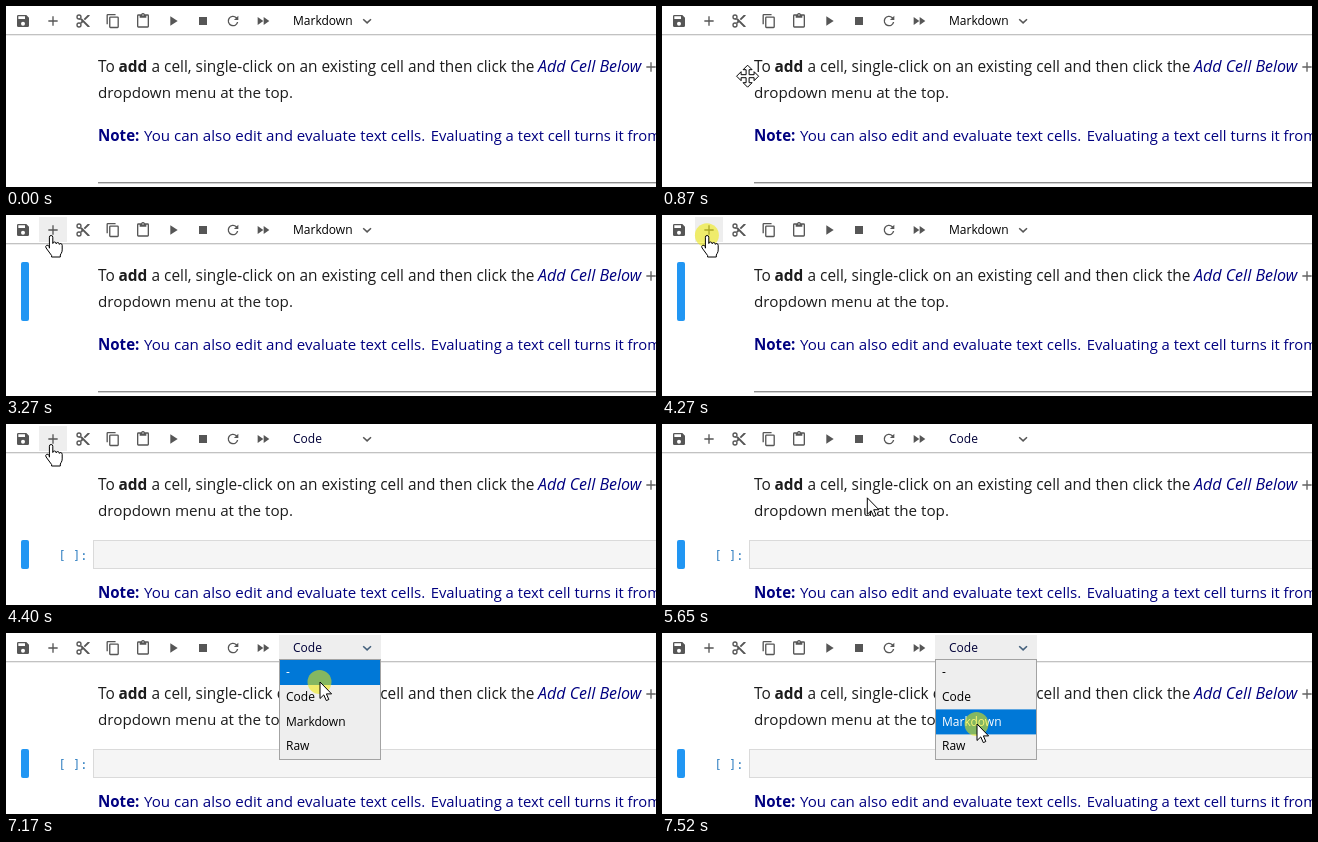
Recreate the animation shown at these times as an HTML page. Size 650 by 181 pixels, loop 8 s.

```html
<!DOCTYPE html>
<html lang="en">
<head>
<meta charset="utf-8">
<title>Adding a notebook cell</title>
<style>
html, body { margin: 0; width: 100%; height: 100%; overflow: hidden; background: #fff; }
svg { display: block; font-family: "Open Sans", "Noto Sans", sans-serif; }
.body { font-size: 15.4px; fill: #1c1c1c; }
.note { font-size: 15.1px; }
.body .navy, .navy { fill: navy; }
.bold { font-weight: 700; }
.ui { font-size: 12px; fill: #000; }
.mono { font: 12px "DejaVu Sans Mono", monospace; fill: #307fc1; white-space: pre; }
#cursor path { fill: #fff; stroke: #000; stroke-width: 1; stroke-linejoin: round; }
</style>
</head>
<body>
<svg width="650" height="181" viewBox="0 0 650 181">
  <rect width="650" height="181" fill="#fff"/>
  <rect id="bar" x="15" width="8" rx="2" fill="#2196f3"/>

  <g class="body">
    <text y="66"><tspan x="92">To</tspan><tspan x="112.5" class="bold">add</tspan><tspan x="145.5">a cell, single-click on an existing cell and then click the</tspan><tspan x="532" class="navy" font-style="italic" font-size="16.1">Add Cell Below</tspan></text>
    <text x="92" y="92" font-size="15.2">dropdown menu at the top.</text>
    <g id="plusMark" fill="#616161"></g>
  </g>

  <g id="cell">
    <rect x="87.5" y="116.5" width="580" height="28" fill="#f5f5f5" stroke="#dadada"/>
    <text class="mono" x="52.5" y="136">[ ]:</text>
  </g>

  <g id="below">
    <text class="body note navy" y="135"><tspan x="92" class="bold">Note:</tspan><tspan x="138">You can also edit and evaluate text cells.</tspan><tspan x="424.7" font-size="14.8">Evaluating a text cell turns it from</tspan></text>
    <rect x="92" y="176" width="558" height="1" fill="#8f8f8f"/>
    <rect x="92" y="177" width="558" height="1" fill="#d2d2d2"/>
  </g>

  <rect width="650" height="28" fill="#fff"/>
  <rect y="28" width="650" height="1" fill="#c2c2c2"/>
  <rect y="29" width="650" height="1" fill="#ececec"/>
  <rect id="plusHover" x="33" y="2" width="28" height="25" fill="#eee"/>
  <rect id="kindHover" x="273" y="2" width="102" height="24" fill="#eee"/>
  <g id="icons" fill="#565656" fill-rule="evenodd"></g>
  <text id="kind" class="ui" x="287" y="19"></text>
  <path id="chevron" d="M357.2 13.2l3.9 3.7 3.9-3.7" fill="none" stroke-width="1.5"/>

  <g id="list">
    <rect x="273.5" y="26.5" width="101" height="100" fill="#eee" stroke="#a3a3a3"/>
    <rect id="pick" x="274" width="100" height="25" fill="#0078d7"/>
  </g>

  <g id="tip">
    <rect x="45.5" y="41.5" width="107" height="21" fill="#fff" stroke="#767676"/>
    <text x="51" y="56.5" font-size="11.5" fill="#575757">Insert a cell below</text>
  </g>

  <circle id="click" r="12" fill="#f0eb00" fill-opacity=".55"/>
  <g id="cursor">
    <path id="arrow" d="M0 0V16.5L3.8 12.9 6.3 18.6 8.8 17.5 6.4 11.9H11.6Z"/>
    <path id="hand" d="M-2 13V2a1.7 1.7 0 0 1 3.4 0V8.3q0-1.6 1.7-1.5t1.7 1.8q.1-1.3 1.6-1.2t1.6 1.8q.3-1 1.5-.8t1.3 1.7v4.6q0 2-1 3.5l-.9 1.6v2H.2v-1.5L-5.3 12.8q-1-1.8 .4-2.6t2.9 1.3z"/>
    <path id="move"/>
  </g>
</svg>
<script>
const LOOP = 8000, ROW = 24.7, LIST_TOP = 27;
const $ = id => document.getElementById(id);
const show = (id, on) => $(id).setAttribute('display', on ? 'inline' : 'none');
const set = (id, name, value) => $(id).setAttribute(name, value);
const ring = (x, y, r) => `M${x - r} ${y}a${r} ${r} 0 1 0 ${2 * r} 0a${r} ${r} 0 1 0 ${-2 * r} 0z`;

const PLUS = 'M19 13h-6v6h-2v-6H5v-2h6V5h2v6h6z';
const icon = (d, cx, cy, box = 24) =>
  `<path transform="translate(${cx - 8} ${cy - 8}) scale(${16 / box})" d="${d}"/>`;

// Toolbar icons, some with the side of their own grid
const ICONS = [
  ['M17 3H5a2 2 0 0 0-2 2v14a2 2 0 0 0 2 2h14a2 2 0 0 0 2-2V7zM15 9H5V5h10z' + ring(12, 16, 3)],
  [PLUS],
  [ring(6, 6, 4) + ring(6, 6, 2) + ring(6, 18, 4) + ring(6, 18, 2) +
    'M9.64 7.64L22 20v1h-3l-7-7-2.36 2.36-2-2L10 12 7.64 9.64zM19 3l-6 6 2 2 7-7V3z'],
  ['M11.9 1H3.2a1.5 1.5 0 0 0-1.5 1.5v10.2h1.5V2.5h8.7zM14.1 3.9h-8a1.5 1.5 0 0 0-1.5 1.5v10.2a1.5 1.5 0 0 0 1.5 1.5h8a1.5 1.5 0 0 0 1.5-1.5V5.4a1.5 1.5 0 0 0-1.5-1.5zM14.1 15.5h-8V5.4h8z', 18],
  ['M19 2h-4.2a3 3 0 0 0-5.6 0H5a2 2 0 0 0-2 2v16a2 2 0 0 0 2 2h14a2 2 0 0 0 2-2V4a2 2 0 0 0-2-2zM19 20H5V4h2v3h10V4h2z' + ring(12, 3, 1)],
  ['M8 5v14l11-7z'],
  ['M6 6h12v12H6z'],
  ['M9 13.5a4.5 4.5 0 1 1 3.17-7.67L10 8h5V3l-1.76 1.76A6 6 0 1 0 14.9 10h-1.52A4.5 4.5 0 0 1 9 13.5z', 18],
  ['M4 18l8.5-6L4 6zM13 6v12l8.5-6z'],
];
$('icons').innerHTML = ICONS.map(([d, box], i) => icon(d, 17 + 30 * i, 15, box)).join('');
$('plusMark').innerHTML = icon(PLUS, 645, 61);

// Four-way cursor: one arm turned by quarter turns
let arm = [[-1.5, -1.5], [-1.5, -6.5], [-4.5, -6.5], [0, -11], [4.5, -6.5], [1.5, -6.5]];
let star = [];
for (let i = 0; i < 4; i++) {
  star = star.concat(arm);
  arm = arm.map(([x, y]) => [-y, x]);
}
set('move', 'd', 'M' + star.join('L') + 'Z');

const options = ['-', 'Code', 'Markdown', 'Raw'].map((label, i) => {
  const el = document.createElementNS('http://www.w3.org/2000/svg', 'text');
  el.textContent = label;
  el.setAttribute('class', 'ui');
  el.setAttribute('x', 280);
  el.setAttribute('y', 43.3 + ROW * i);
  $('list').append(el);
  return el;
});

const smooth = p => p * p * (3 - 2 * p);
const easeOut = p => 1 - (1 - p) ** 2;
const linear = p => p;

// Bézier curve over any number of [x, y] points
function along(pts, p) {
  while (pts.length > 1)
    pts = pts.slice(1).map((b, i) => b.map((v, k) => pts[i][k] + (v - pts[i][k]) * p));
  return pts[0];
}

// The pointer is sampled in n steps; lead = 1 when the first step has already left the start
const MOVES = [
  { from: 490, to: 1000, n: 5, lead: 0, ease: easeOut, pts: [[192, 133], [78.5, 66]] },
  { from: 1150, to: 1150, n: 1, lead: 1, ease: linear, pts: [[78.5, 66], [77.5, 65.5]] },
  { from: 2750, to: 3270, n: 5, lead: 1, ease: smooth, pts: [[77.5, 65.5], [45.4, 20.2]] },
  { from: 5270, to: 6020, n: 7, lead: 1, ease: smooth, pts: [[45.4, 20.2], [90, 92], [255, 88], [298, 38]] },
  { from: 6150, to: 6400, n: 3, lead: 1, ease: linear, pts: [[298, 38], [313, 15]] },
  { from: 7030, to: 7030, n: 1, lead: 1, ease: linear, pts: [[313, 15], [313, 26]] },
  { from: 7170, to: 7520, n: 4, lead: 0, ease: linear, pts: [[314, 49], [315, 91]] },
];

function pointer(t) {
  const m = MOVES.filter(m => t >= m.from).pop();
  if (!m) return null;
  const span = m.to - m.from;
  const k = span ? Math.min(m.n - 1, Math.floor((t - m.from) / span * (m.n - 1) + 0.04)) : 0;
  return along(m.pts, m.ease((k + m.lead) / (m.n - 1 + m.lead)));
}

function shape(x, y) {
  if (y < 28 && x < 61) return 'hand';
  return y > 47 && x < 90 ? 'move' : 'arrow';
}

function draw(t) {
  const added = t >= 4400, selected = t >= 2010, open = t >= 6650;
  const at = pointer(t);

  show('bar', selected);
  set('bar', 'y', added ? 116 : 47);
  set('bar', 'height', added ? 29 : 59);
  show('cell', added);
  set('below', 'transform', `translate(0 ${added ? 39 : 0})`);
  $('kind').textContent = added ? 'Code' : 'Markdown';
  $('kind').style.fill = added ? '#000038' : '#000';
  show('tip', t >= 3890 && t < 4270);
  show('list', open);

  const [x, y] = at || [-50, 99];
  const overBar = y > 2 && y < 27;
  const overKind = open || (overBar && x > 273 && x < 375);
  show('plusHover', overBar && x > 33 && x < 61);
  show('kindHover', overKind);
  set('chevron', 'stroke', overKind ? '#44607c' : '#565656');

  const row = t < 7170 ? 1 : Math.floor((y - LIST_TOP) / ROW);
  set('pick', 'y', LIST_TOP + ROW * row);
  options.forEach((el, i) => { el.style.fill = i === row ? '#fff' : '#000'; });

  show('click', (t >= 1880 && t < 2010) || (t >= 4270 && t < 4400) || open);
  set('click', 'cx', x - 0.5);
  set('click', 'cy', y);

  show('cursor', at);
  set('cursor', 'transform', `translate(${x} ${y})`);
  const now = shape(x, y);
  for (const name of ['arrow', 'hand', 'move']) show(name, name === now);
}

function tick() {
  draw(performance.now() % LOOP);
  requestAnimationFrame(tick);
}
tick();
</script>
</body>
</html>
```
